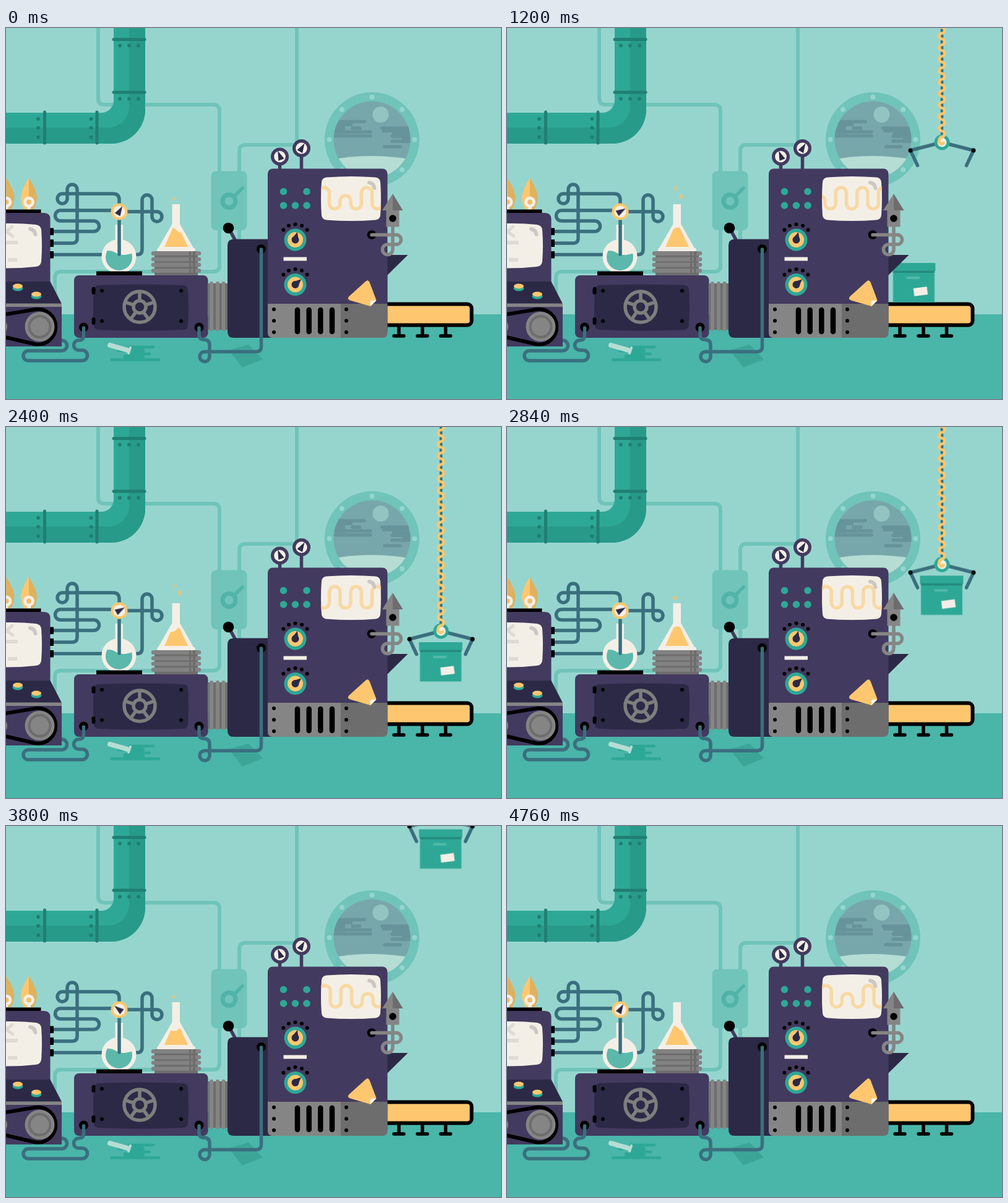
Recreate the animation shown at these times as an HTML page. Size 800 by 600 pixels, loop 4800 ms.

```html
<!DOCTYPE html>
<html lang="en">
<head>
<meta charset="utf-8">
<title>Packing machine</title>
<style>
html, body { margin: 0; width: 100%; height: 100%; overflow: hidden; background: #96d5ce; }
svg { display: block; width: 100vw; height: 100vh; }
.line { fill: none; stroke-linecap: round; stroke-linejoin: round; }
.wall { stroke: #70c4ba; stroke-width: 6; }
.tube { stroke: #3a6f7e; stroke-width: 5.5; }
.band { stroke: #207f73; stroke-width: 5; }
.body { fill: #433a5f; } .dark { fill: #2c2946; } .cream { fill: #f4efe6; }
.teal { fill: #2ea896; } .gold { fill: #fec76f; } .gray { fill: #858585; } .gray2 { fill: #6d6d6d; }
.claw, .carton, .fore, .needle, .wave, .bulb, .bubble { animation: 4800ms linear infinite; }
.claw { animation-name: claw; }
.carton { animation-name: carton; }
.fore { animation-name: grip; }
.needle { animation-name: needle; }
.wave { animation-name: wave; }
.bulb { animation-name: bulb; }
.bubble { animation-name: bubble; opacity: 0; }
.slosh { animation: slosh 1600ms linear infinite; }
@keyframes claw {
  0% { transform: translate(703px, -107px); }
  40.2%, 47.3% { transform: translate(703px, 362px); }
  100% { transform: translate(703px, -257px); }
}
@keyframes carton {
  0% { transform: translate(583px, 380px); }
  40.2%, 47.3% { transform: translate(702.5px, 380px); }
  100% { transform: translate(702.5px, -239px); }
}
@keyframes grip {
  0%, 40.2% { transform: rotate(0deg); }
  46%, 100% { transform: rotate(-13.4deg); }
}
@keyframes needle {
  0%, 14.5% { transform: rotate(30deg); }
  21%, 71.5% { transform: rotate(60deg); }
  78%, 83% { transform: rotate(-52deg); }
  91.5%, 100% { transform: rotate(30deg); }
}
@keyframes wave { to { transform: translateX(-172.5px); } }
@keyframes slosh { to { transform: translateX(-36px); } }
@keyframes bulb {
  0%, 6%, 8%, 29%, 31%, 53%, 55%, 64%, 66%, 100% { opacity: 1; }
  7%, 30%, 54%, 65% { opacity: .75; }
}
@keyframes bubble {
  0% { opacity: 1; transform: translate(0, 0) scale(.3); stroke-width: 3; }
  1% { opacity: 1; transform: translate(0, -1px) scale(.8); stroke-width: 2.6; }
  11% { opacity: .85; transform: translate(calc(var(--dx) * .75), -14px) scale(1.1); stroke-width: 1.4; }
  15% { opacity: 0; transform: translate(var(--dx), -19px) scale(1.25); stroke-width: 1; }
  100% { opacity: 0; transform: translate(var(--dx), -19px) scale(1.25); stroke-width: 1; }
}
</style>
</head>
<body>
<svg viewBox="0 0 800 600" preserveAspectRatio="none">
<defs>
  <clipPath id="glass"><circle cx="591.5" cy="180.5" r="62"/></clipPath>
  <clipPath id="cone"><path d="M272 318H277L294 354H256Z"/></clipPath>
  <clipPath id="bowl"><circle cx="182.5" cy="370.5" r="21.5"/></clipPath>
  <path id="crt" d="M518 241.500Q557.500 238.500 597 241.500Q604 242 605 249Q607 276 605 303Q604 310 597 310.500Q557.500 313.500 518 310.500Q511 310 510 303Q508 276 510 249Q511 242 518 241.500Z"/>
  <clipPath id="screen"><use href="#crt"/></clipPath>
  <path id="hand" class="dark" d="M0-11L5.500 6H-5.500Z"/>
  <g id="lamp">
    <path class="gold" d="M0-51Q-13-31-13-18Q-12-7-7 0H0Z"/>
    <path fill="#e0b15d" d="M0-51Q13-31 13-18Q12-7 7 0H0Z"/>
    <path class="cream" d="M-3-5H3V0H-3Z"/>
    <circle class="cream" cy="-12" r="9"/><circle fill="#f0bd68" cy="-12" r="4"/>
  </g>
  <g id="arm">
    <path class="line tube" d="M0 0L-51 13"/>
    <g transform="translate(-51 13)">
      <path class="line tube fore" d="M0 0L11.500 24.500"/><circle r="3.500"/>
    </g>
  </g>
</defs>

<rect width="800" height="600" fill="#96d5ce"/>
<rect y="463" width="800" height="137" fill="#4ab5a9"/>

<!-- wall -->
<path class="line wall" d="M149 0V114Q149 124 159 124H335Q345 124 345 134V384Q345 394 335 394H89Q79 394 79 404V440M470 0V189M377 350V199Q377 189 387 189H470"/>
<rect x="331.500" y="231.500" width="58" height="95.500" rx="8" fill="#70c4ba"/>
<g class="line" stroke="#52b3a8"><circle cx="360.500" cy="280" r="10.500" stroke-width="7"/><path d="M368 273L382 259" stroke-width="5.500"/></g>

<circle cx="591.500" cy="180.500" r="76.500" fill="#70c4ba"/>
<g id="bolts" fill="#96d5ce"></g>
<g clip-path="url(#glass)">
  <rect x="525" y="115" width="135" height="130" fill="#78a7ab"/>
  <circle cx="605.500" cy="140" r="13" fill="#94c4c1"/>
  <path fill="#67949a" d="M525 154H560V159H548V171.500H525ZM608 160H660V186H640V178H624V169H608Z"/>
  <path class="line" stroke="#67949a" stroke-width="5.500" d="M525 151.500H579M560 162H572M548 168H589M525 174.500H589M608 162H660M624 175H655M624 183H640M612 192H637"/>
  <path d="M520 214Q591 200 662 214V250H520Z" fill="#b5ddd4"/>
</g>

<!-- big pipe -->
<path class="teal" d="M174 0H225V132A55 55 0 0 1 170 187H0V137H154A20 20 0 0 0 174 117Z"/>
<path fill="#289a89" d="M199 0H225V132A55 55 0 0 1 170 187H0V161H165A34 34 0 0 0 199 127Z"/>
<path class="line band" d="M174 18.500H224M174 104H224M62.500 136V186M147 136V186"/>
<g id="rivets" fill="#207f73"></g>

<!-- floor litter -->
<path class="line" stroke="#2ea896" stroke-width="4.500" d="M200 516H238M182 522H222M198 527H232M171 536.500H247M200 532H222"/>
<path class="teal" d="M198 516H222V536H190V528H198Z"/>
<path class="line" stroke="#b5ddd4" d="M168 513L196 521" stroke-width="8"/>
<path class="line" stroke="#b5ddd4" d="M201 517L198 526" stroke-width="4"/>
<path fill="#3ca598" d="M360 521L392 512L415 536L382 549Z"/>

<!-- tubes -->
<path class="line tube" d="M75 329H142A8.500 8.500 0 0 0 142 312H88A8.500 8.500 0 0 1 88 295H170M75 348H107Q115 348 115 340V261A8 8 0 0 0 99 261V276A8 8 0 1 1 91 268H173Q183 268 183 278V290M75 366.500H212Q220 366.500 220 358V278A8 8 0 0 1 236 278V305A8 8 0 1 0 244 297H190"/>

<!-- round flask -->
<path class="cream" d="M176.500 318H189V350H176.500Z"/>
<circle class="cream" cx="182.500" cy="369.500" r="28"/>
<path clip-path="url(#bowl)" fill="#5bb8ab" d="M155 362Q168 357 178 364T210 362V400H155Z"/>
<path class="line tube" d="M183 305V366"/>
<circle class="gold" cx="183" cy="297" r="13.500"/><circle class="cream" cx="183" cy="297" r="9.500"/>
<g transform="translate(183 297)"><g class="needle"><use href="#hand" transform="scale(.92)"/></g></g>
<path d="M146 393.500H220V400H146Z"/>

<!-- coil and flask -->
<path class="gray2" d="M240 361H310V400H240Z"/>
<path class="line" stroke="#828282" stroke-width="6.500" d="M238 364.500H312M238 374H312M238 383H312M238 392.500H312"/>
<path fill="#6d6d6d" d="M296 361H299V400H296ZM302 361H306V400H302Z"/>
<path class="cream" d="M268.500 285H281V317L303 356H304Q306 356 306 358.500T304 361H246Q244 361 244 358.500T246 356L268.500 317Z"/>
<g clip-path="url(#cone)"><path class="gold slosh" d="M222 327q9-9 18 0t18 0t18 0t18 0t18 0t18 0t18 0V360H222Z"/></g>
<g id="bubbles" fill="none" stroke="#f2c26c"></g>

<!-- left cable, ports box -->
<rect class="body" x="110" y="400" width="216.500" height="101" rx="8"/>
<path class="dark" d="M150 416Q218 413 286 416Q294 416 294 424Q296 452 294 480Q294 488 286 488Q218 491 150 488Q142 488 142 480Q140 452 142 424Q142 416 150 416Z"/>
<rect x="138.500" y="419" width="6" height="12" rx="3"/><rect x="138.500" y="468" width="6" height="12" rx="3"/>
<g id="screws"></g>
<g id="valve" class="line" stroke="#7e7e7e" stroke-width="5.500" transform="translate(216 451)"><circle r="25"/><circle r="10"/></g>
<rect class="gray2" x="327" y="413" width="31" height="75"/>
<path class="line" stroke="#858585" stroke-width="6" d="M332 413V487M342 413V487M351.500 413V487"/>

<!-- conveyor -->
<path class="line" stroke="#000" stroke-width="5.500" d="M635 484V498M627 498H643M673 484V498M665 498H681M710.500 484V498M702.500 498H718.500"/>
<rect class="gold" x="600" y="446.500" width="152.500" height="34" rx="7" stroke="#000" stroke-width="6"/>

<g class="carton">
  <path class="teal" d="M-33.500 10H33.500V63.500H-33.500ZM-35 0H35V13H-35Z"/>
  <path fill="#248a7e" d="M-33.500 12.500H33.500V16H-33.500Z"/>
  <path class="line" stroke="#52b9aa" stroke-width="4" d="M-10.500 24H8"/>
  <rect class="cream" x="-11" y="-6.500" width="22" height="13" transform="translate(11 46) rotate(-7)"/>
</g>

<g class="claw">
  <path class="line" stroke="#3a6f7e" stroke-width="4.500" d="M0 0V-480"/>
  <use href="#arm"/><use href="#arm" transform="scale(-1 1)"/>
  <circle class="teal" r="12.500"/><circle class="cream" r="7.500"/>
  <path id="chain" class="line" stroke="#fec76f" stroke-width="4.600"/>
</g>

<!-- main machine -->
<path class="line" stroke="#433a5f" stroke-width="5.500" d="M360 324L372 346M442.500 215V232M477.500 205V232"/>
<circle cx="359.500" cy="323.500" r="8.800"/>
<path class="dark" d="M368 341.500H430V501H368Q358 501 358 491V351.500Q358 341.500 368 341.500Z"/>
<path class="dark" d="M610 367H649.500L610 406Z"/>
<rect class="body" x="423" y="227.500" width="193.500" height="270" rx="8"/>
<path class="gray" d="M423 446H541V501H431Q423 501 423 493Z"/>
<path class="gray2" d="M541 446H616.500V493Q616.500 501 608.500 501H541Z"/>
<path class="line" stroke="#000" stroke-width="8.500" d="M471 456V491M489.700 456V491M508.300 456V491M527 456V491"/>
<g id="lights" class="teal"></g>
<g id="dials"></g>
<path class="cream" d="M448.500 370.500H486V376.500H448.500Z"/>
<use href="#crt" class="cream"/>
<g clip-path="url(#screen)"><path id="trace" class="line wave" stroke="#f8d9a4" stroke-width="5.500"/></g>
<path class="line" stroke="#cdc7c4" stroke-width="6" d="M587 250Q594 251 595.500 259"/>
<path class="gold" d="M581 410Q585 406 587.500 411L598.500 440L589 450L556 440.500Q550 438 555 433.500Z"/>
<path fill="#fff8ea" d="M598.500 441L589 450L588.500 444Q589 440 593 440.500Z"/>
<g class="body"><circle cx="442.500" cy="208" r="14.500"/><circle cx="477.500" cy="194.500" r="14.500"/></g>
<g class="cream"><circle cx="442.500" cy="208" r="9.300"/><circle cx="477.500" cy="194.500" r="9.300"/></g>
<use href="#hand" transform="translate(443 208) rotate(-22) scale(.9)"/>
<use href="#hand" transform="translate(477.500 195) rotate(30) scale(.9)"/>

<circle cx="591" cy="334.500" r="7.300"/>
<path class="line" stroke="#858585" stroke-width="5.500" d="M591 334.500H632.500A8 8 0 0 1 632.500 350H617A8.300 8.300 0 1 0 625 358V318"/>
<path class="gray" d="M625 268L608 295H625ZM614.500 295H625V321.500H614.500Z"/>
<path class="gray2" d="M625 268L641.500 295H625Z"/>
<path class="gray" d="M624 295H635.500V321.500H624Z"/>
<circle cx="625" cy="308" r="5.800"/>

<!-- cables -->
<circle cx="125.500" cy="484" r="7.500"/><circle cx="312" cy="484" r="7.500"/><circle cx="412.500" cy="357.500" r="7.500"/>
<path class="line tube" d="M125.500 485V497Q125.500 505 117.500 505A8 8 0 0 0 117.500 521H123A8.500 8.500 0 0 1 123 538H36A8 8 0 0 1 36 522H90A8.500 8.500 0 0 0 90 505H80M312 485V496Q312 504 320 504Q329 504 329 513V532A8 8 0 1 1 321 523.500H404Q412.500 523.500 412.500 515V358"/>

<!-- console -->
<use href="#lamp" x="0.500" y="293.500"/>
<g class="bulb"><use href="#lamp" x="37" y="293.500"/></g>
<path d="M0 293.500H56.500V300H0ZM70 323.500H77V335H70ZM70 342H77V354H70ZM70 361H77V372.500H70Z"/>
<path class="body" d="M0 299H61Q71.500 299 71.500 309V412H0ZM0 450H90V515H0Z"/>
<path class="cream" d="M0 316Q25 315.500 48 318Q56 319 57 326Q59 352 57 378Q56 385 48 386Q25 388.500 0 388.500Z"/>
<path class="line" stroke="#cdc7c4" stroke-width="6" d="M39 325Q46 326 47.500 334"/>
<path fill="#dfdad4" d="M0 344H19V350H0ZM3 372H18V378H3ZM0 326L10 318L13 322L5 329L14 336L11 340L0 332Z"/>
<path class="dark" d="M0 410H71.500L90 446H0Z"/>
<path class="gray" d="M0 445.500H90V451H0Z"/>
<g class="teal"><ellipse cx="19" cy="421" rx="8.500" ry="4.500"/><ellipse cx="49" cy="434" rx="8.500" ry="4.500"/></g>
<g class="gold"><ellipse cx="19" cy="417.500" rx="8" ry="4"/><ellipse cx="49" cy="430.500" rx="8" ry="4"/></g>
<path class="line" stroke="#000" stroke-width="6" d="M-6 464L48 455A28.500 28.500 0 1 1 48 511.500L-6 499"/>
<circle class="gray" cx="54.500" cy="483" r="24"/>
<circle class="line" cx="54.500" cy="483" r="17" stroke="#6d6d6d" stroke-width="4"/>
<circle class="gray" cx="-12" cy="483" r="14"/>
</svg>
<script>
const $ = id => document.getElementById(id);
const add = (id, markup) => $(id).insertAdjacentHTML('beforeend', markup);
const dot = (x, y, r = 3) => `<circle cx="${x}" cy="${y}" r="${r}"/>`;
const dots = (id, xs, ys, r) => xs.forEach(x => ys.forEach(y => add(id, dot(x, y, r))));
const polar = (x, y, r, deg) => {
  const a = deg * Math.PI / 180;
  return [x + r * Math.sin(a), y - r * Math.cos(a)];
};

dots('rivets', [184, 199, 214], [28.5, 114.5]);
dots('rivets', [52, 137.5], [147, 161.5, 176.5]);
dots('screws', [155, 283], [425, 474]);
dots('lights', [448.5, 486], [264.5, 287], 5.8);
add('lights', dot(467.5, 287, 5.8));
dots('dials', [433, 550], [455, 473.5, 492]);

for (let a = 0; a < 360; a += 45) add('bolts', dot(...polar(591.5, 180.5, 68.8, a), 4));
for (let a = 0; a < 360; a += 72) {
  const [x1, y1] = polar(0, 0, 11, a), [x2, y2] = polar(0, 0, 24, a);
  add('valve', `<path d="M${x1} ${y1}L${x2} ${y2}"/>`);
}

[[342.5, 15], [415, 48]].forEach(([y, turn]) => {
  for (let a = -50; a <= 50; a += 25) add('dials', dot(...polar(467.5, y, 25, a)));
  add('dials', `<g transform="translate(467.5 ${y}) rotate(${turn})"><circle class="teal" r="18"/>
    <circle class="gold" r="12.5"/><circle class="dark" r="6"/><path class="dark" d="M-4-4L0-13L4-4Z"/></g>`);
});

// Chain: alternating half turns above the hook
let chain = 'M2.500 1Q-2 5-5-1Q-5-7 0-9';
for (let i = 0; i < 50; i++) chain += `a4.200 4.650 0 0 ${i % 2} 0-9.300`;
$('chain').setAttribute('d', chain);

// Screen trace: every fifth crest is low
const step = 34.5, r = step / 4;
let trace = `M${583 - 3 * step - r} 284`;
for (let k = -3; k < 8; k++) {
  const top = ((k + 5) % 5 === 4 ? 271 : 258) + r;
  trace += `V${top}a${r} ${r} 0 0 1 ${2 * r} 0V284a${r} ${r} 0 0 0 ${2 * r} 0`;
}
$('trace').setAttribute('d', trace);

// Bubbles: start time, x, y, drift
[[-25, 271, 277, -4], [660, 274, 274, -2], [1140, 281, 274, 3], [1815, 276, 273, -5], [2070, 279, 277, 2],
 [2770, 271, 278, -3], [3010, 277, 277, -5], [3770, 271, 277, 4], [4020, 273, 276, -5]
].forEach(([t, x, y, dx]) => add('bubbles',
  `<g transform="translate(${x} ${y})"><circle class="bubble" r="2.600" style="--dx:${dx}px;animation-delay:${t - 4800}ms"/></g>`));
</script>
</body>
</html>
```
